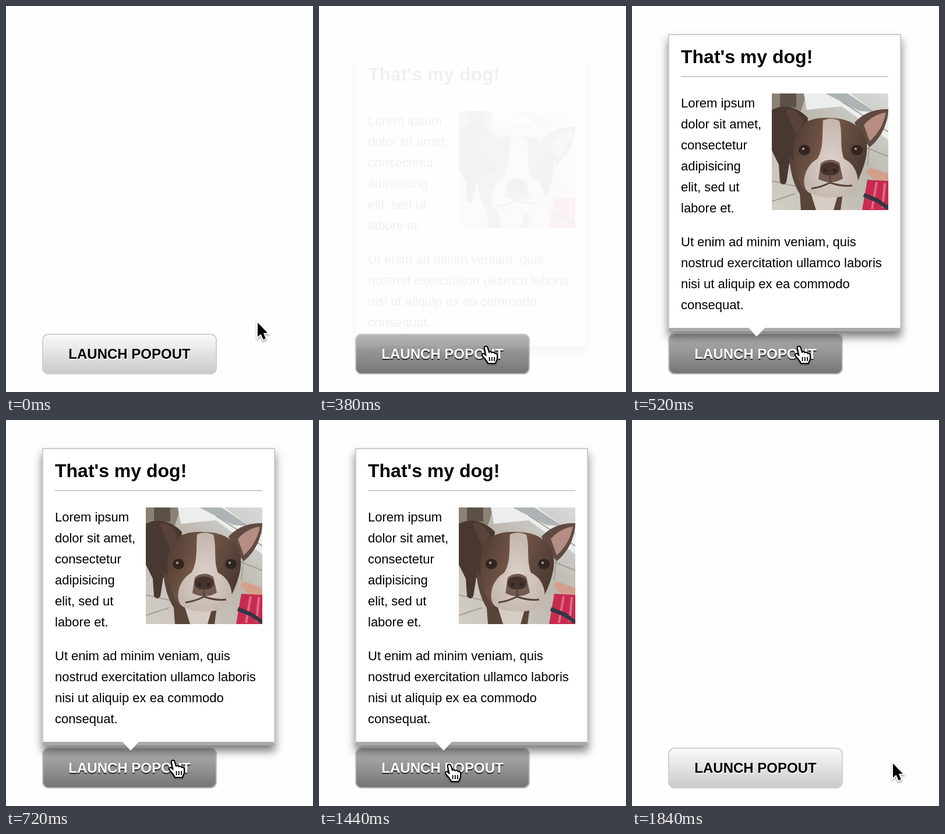
These frames come from a looping animation (527 px wide and 662 px high, 2140 ms). An HTML page:

```html
<!DOCTYPE html>
<html lang="en">
<head>
<meta charset="utf-8">
<title>Popout button</title>
<style>
  html, body { margin: 0; width: 100%; height: 100%; overflow: hidden; background: #fefefe; }
  body { position: relative; font-family: "Liberation Sans", Arial, Helvetica, sans-serif; color: #000; }
  div, h2, p, svg { position: absolute; margin: 0; box-sizing: border-box; white-space: pre; }

  .button {
    left: 62px; top: 562px; width: 300px; height: 70px;
    border: 2px solid #d0d0d0; border-radius: 11px;
    background: linear-gradient(#fafafa, #c9cac9);
    font: bold 24px/66px "Liberation Sans", Arial, Helvetica, sans-serif;
    text-align: center; text-shadow: 1px 2px 1px #fff;
  }
  .lit {
    border-color: #c3c3c3; background: linear-gradient(#b2b2b2, #757575);
    color: #fff; text-shadow: 0 2px 1px #222;
    animation: over 2140ms step-end infinite;
  }

  .popout {
    left: 62px; top: 48px; width: 400px; height: 510px;
    border: 2px solid #ccc; border-bottom: 6px solid #a9a9a9;
    background: #fff; box-shadow: 0 10px 14px rgba(0, 0, 0, .5);
    animation: pop 2140ms infinite;
  }
  .popout::after {
    content: ""; position: absolute; left: 136px; top: 502px;
    border: 14px solid transparent; border-top: 15px solid #fff; border-bottom: 0;
  }
  h2 { left: 20px; top: 18px; font-size: 32px; line-height: 38px; }
  .rule { left: 20px; top: 70px; width: 356px; height: 2px; background: #ccc; }
  p { left: 20px; font-size: 22px; line-height: 36px; }
  .intro { top: 99px; }
  .rest { top: 337px; }
  .photo { left: 176px; top: 100px; }

  .cursor { left: 0; top: 0; width: 0; height: 0; animation: travel 2140ms linear infinite; }
  .cursor svg { left: -14px; top: -6px; overflow: visible; }
  .arrow { filter: drop-shadow(0 2px 1.5px rgba(0, 0, 0, .4)); animation: away 2140ms step-end infinite; }
  .hand { filter: drop-shadow(0 2px 1px rgba(0, 0, 0, .3)); animation: over 2140ms step-end infinite; }

  @keyframes travel {
    0%, .5% { transform: translate(432px, 543px); }
    4.67% { transform: translate(362px, 562px); }
    9.8%, 42.76% { transform: translate(287px, 584px); animation-timing-function: ease-in-out; }
    49.53%, 67.8% { transform: translate(224px, 591px); animation-timing-function: linear; }
    69.63% { transform: translate(362px, 592px); }
    71.03%, 81.54% { transform: translate(434px, 591px); }
    85.9%, 100% { transform: translate(448px, 589px); }
  }
  @keyframes over {
    0% { opacity: 0; }
    4.67% { opacity: 1; }
    69.63%, 100% { opacity: 0; }
  }
  @keyframes away {
    0% { opacity: 1; }
    4.67% { opacity: 0; }
    69.63%, 100% { opacity: 1; }
  }
  @keyframes pop {
    0%, 17.29% { opacity: 0; transform: translateY(32px); animation-timing-function: ease; }
    24.3%, 68.46% { opacity: 1; transform: none; animation-timing-function: ease; }
    75.47%, 100% { opacity: 0; transform: translateY(32px); }
  }
</style>
</head>
<body>
<div class="button">LAUNCH POPOUT</div>
<div class="button lit">LAUNCH POPOUT</div>

<div class="popout">
  <h2>That's my dog!</h2>
  <div class="rule"></div>
  <p class="intro">Lorem ipsum
dolor sit amet,
consectetur
adipisicing
elit, sed ut
labore et.</p>
  <svg class="photo" width="200" height="200" viewBox="0 0 200 200">
    <defs>
      <linearGradient id="floor" x1="0" y1="1" x2="1" y2="0">
        <stop offset="0" stop-color="#d3cec6"/>
        <stop offset=".55" stop-color="#bcb7af"/>
        <stop offset="1" stop-color="#d9dbda"/>
      </linearGradient>
      <linearGradient id="fur" x2="1" y2=".4">
        <stop offset="0" stop-color="#4b382f"/>
        <stop offset=".5" stop-color="#765848"/>
        <stop offset="1" stop-color="#4e3b33"/>
      </linearGradient>
      <radialGradient id="muzzle" cy=".55">
        <stop offset="0" stop-color="#ddd2cb"/>
        <stop offset="1" stop-color="#c5b8af"/>
      </radialGradient>
    </defs>
    <rect width="200" height="200" fill="url(#floor)"/>
    <path d="M0 0H60L50 30 0 38Z" fill="#8b8174"/>
    <path d="M14 0H42V24H14Z" fill="#5b5147"/>
    <path d="M55 0H135L200 48V80L120 22 60 28Z" fill="#eceeec"/>
    <path d="M92 0H130L178 32 150 30Z" fill="#aeb4b5"/>
    <path d="M0 150 45 160M0 185 40 172M155 90 200 108M170 60 164 125M120 14 200 66" stroke="#a49e96" stroke-width="2" fill="none"/>
    <path d="M0 28C22 16 48 26 62 42L54 130 30 120 25 152Q20 160 14 152L12 122 0 98Z" fill="#493830"/>
    <path d="M30 110C32 140 40 160 48 172L50 200H118L122 170Z" fill="#59443a"/>
    <path d="M66 168 76 200H106L114 172Z" fill="#d5ccc5"/>
    <path d="M54 48C44 30 34 24 24 28 30 44 36 56 42 70Z" fill="#59423a"/>
    <path d="M142 50C158 32 180 26 200 27 199 52 188 76 168 92L154 76Z" fill="#604a41"/>
    <path d="M158 54C170 40 184 34 196 33 192 53 182 70 168 82Z" fill="#b58d82"/>
    <path d="M42 68C48 48 74 40 100 42 132 42 156 56 162 82 168 108 152 142 140 164 118 178 78 180 56 164 38 146 32 96 42 68Z" fill="url(#fur)"/>
    <path d="M88 46Q102 40 116 47C122 68 116 92 124 112 146 122 154 152 142 168 122 182 82 182 62 169 50 158 54 126 78 112 90 94 86 66 88 46Z" fill="url(#muzzle)"/>
    <path d="M84 120Q100 108 116 119L122 146Q102 158 80 147Z" fill="#725a4e"/>
    <path d="M84 126C88 116 112 116 116 126 118 138 108 142 100 140 90 142 82 136 84 126Z" fill="#44332e"/>
    <path d="M100 139V154M68 163Q84 161 100 153 120 160 138 158" stroke="#594338" stroke-width="3" fill="none"/>
    <g fill="#31251f">
      <ellipse cx="56" cy="97" rx="10" ry="9"/>
      <ellipse cx="146" cy="97" rx="10" ry="9"/>
      <ellipse cx="92" cy="132" rx="3" ry="3"/>
      <ellipse cx="108" cy="132" rx="3" ry="3"/>
    </g>
    <circle cx="54" cy="95" r="2" fill="#b9aaa0"/>
    <circle cx="144" cy="95" r="2" fill="#b9aaa0"/>
    <path d="M163 136Q162 126 172 128L200 138V158L174 146Z" fill="#d3a08b"/>
    <path d="M164 148 200 150V200H155Z" fill="#c72b50"/>
    <path d="M180 152 172 198M194 154 190 196" stroke="#e36a83" stroke-width="4"/>
    <path d="M158 174 182 184 200 197" stroke="#343644" stroke-width="7" fill="none"/>
  </svg>
  <p class="rest">Ut enim ad minim veniam, quis
nostrud exercitation ullamco laboris
nisi ut aliquip ex ea commodo
consequat.</p>
</div>

<div class="cursor">
  <svg class="arrow" width="40" height="44" viewBox="-14 -6 40 44">
    <path d="M0 0V24.5L5.4 19.4 9.6 29 13.8 27.2 9.8 17.8H17Z" stroke="#fff" stroke-width="4" paint-order="stroke"/>
  </svg>
  <svg class="hand" width="40" height="44" viewBox="-14 -6 40 44">
    <path d="M-3.2 3C-3.6 -1.2 1.4 -1.6 2.6 2L5 10C6.4 8 9 8.6 9.8 10.6 11.4 9.2 14 9.8 14.6 12 16.6 11.2 19 12.4 19 15V20C19 24 16.6 25 16 29H3C2 25 -3.4 20 -6.6 15.8 -8.4 12.6 -5 11 -2.6 13L-.4 15.2Z" fill="#fff" stroke="#000" stroke-width="2" stroke-linejoin="round"/>
    <path d="M5.6 18V25M9.8 18V25M14 18V25" stroke="#000" stroke-width="1.8"/>
  </svg>
</div>
</body>
</html>
```
